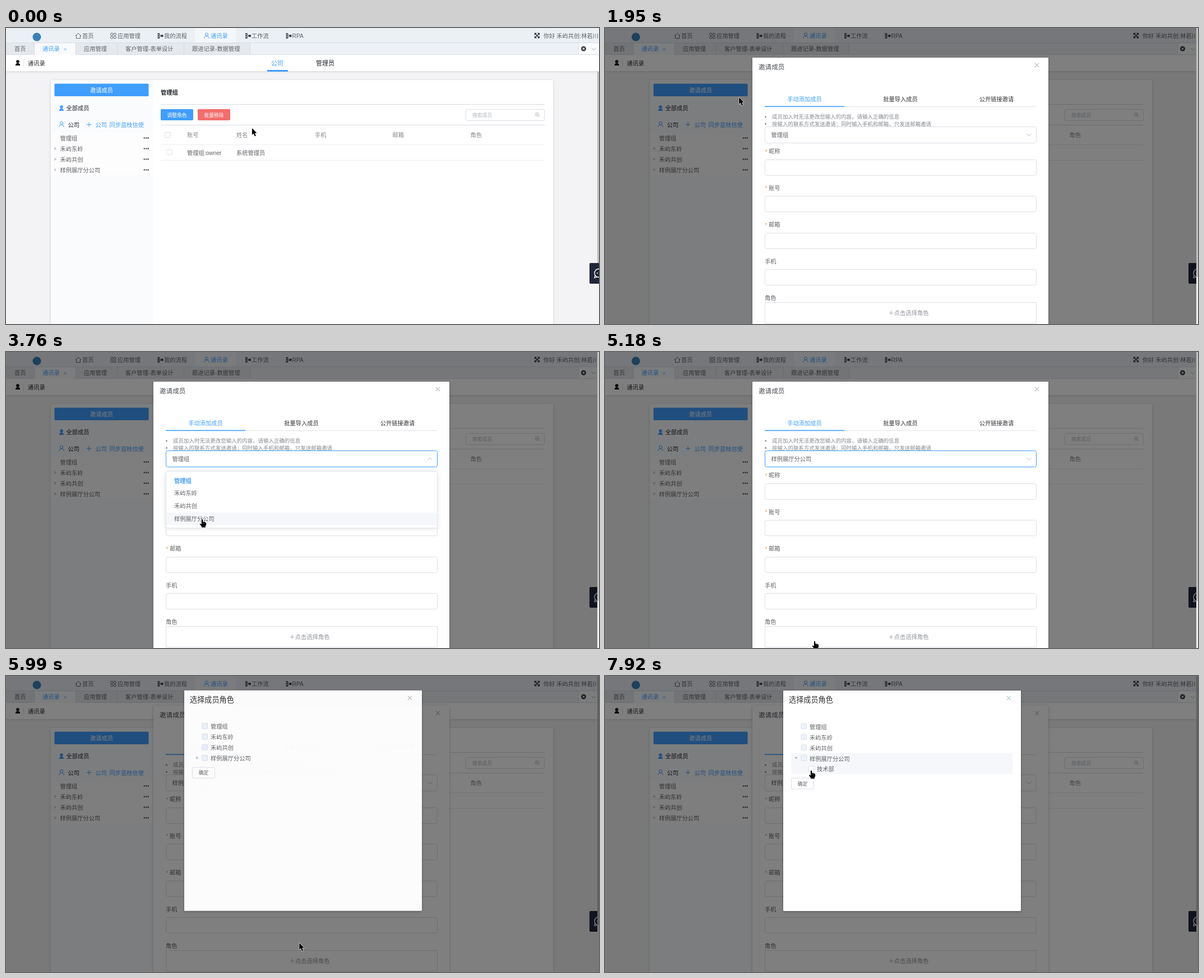
An HTML page with a canvas that plays this animation: 1058 px wide and 529 px high, repeating every 7.99 s.

```html
<!DOCTYPE html>
<html lang="zh-CN">
<head>
<meta charset="utf-8">
<title>邀请成员</title>
<style>
html, body { margin: 0; width: 100%; height: 100%; overflow: hidden; background: #f3f3f5; }
canvas { display: block; width: 1058px; height: 529px; }
</style>
</head>
<body>
<canvas id="stage" width="1058" height="529"></canvas>
<script>
const W = 1058, H = 529, LOOP = 7990;
const layer = document.createElement('canvas');
layer.width = W;
layer.height = H;
let ctx = document.getElementById('stage').getContext('2d');
const FONT = '"Liberation Sans", "Noto Sans CJK SC", "Noto Sans CJK", sans-serif';
const BLUE = '#409eff', INK = '#606266', DARK = '#1f2329', GREY = '#909399', LINE = '#dcdfe6';
const GROUPS = ['管理组', '禾屿东岭', '禾屿共创', '样例展厅分公司'];

// Bursts of screen updates: start, end, number of updates
const BURSTS = [
  [70, 810, 10], [890, 1030, 3], [1420, 1510, 2], [1950, 2660, 10],
  [2820, 2980, 3], [3060, 3580, 8], [3680, 3760, 2], [4280, 5000, 10],
  [5080, 5180, 2], [5230, 5520, 5], [5690, 5860, 3], [5990, 6420, 7],
  [6490, 6670, 3], [6750, 6960, 4], [7130, 7210, 2], [7510, 7920, 6]
];

// Pointer path: time, x, y
const PATH = [
  [0, 439, 179], [350, 370, 190], [810, 232, 124], [1030, 225, 114],
  [1880, 225, 114], [2200, 290, 160], [2450, 368, 202], [2660, 310, 197],
  [3060, 310, 197], [3580, 369, 280], [3760, 350, 299], [4360, 350, 299],
  [4750, 378, 452], [5000, 361, 495], [5180, 374, 517], [5520, 537, 508],
  [5930, 537, 508], [6420, 425, 255], [6670, 378, 166], [6960, 346, 145],
  [7210, 348, 145], [7450, 348, 145], [7920, 368, 169]
];
const HAND_TIMES = [[890, 1420], [2300, 4400], [4900, 5690], [6750, LOOP]];

const clamp = v => Math.max(0, Math.min(1, v));
const easeOut = (p, n) => 1 - Math.pow(1 - clamp(p), n);
const within = (t, a, b) => t >= a && t < b;

function snap(t) {
  let last = 0;
  for (const [a, b, n] of BURSTS) {
    if (t < a) break;
    const step = (b - a) / (n - 1);
    last = a + step * Math.min(n - 1, Math.floor((t - a) / step + 1e-6));
  }
  return last;
}

function pointer(t) {
  const i = PATH.findIndex(p => p[0] >= t);
  if (i < 0) return PATH[PATH.length - 1].slice(1);
  if (i === 0) return PATH[0].slice(1);
  const [t0, x0, y0] = PATH[i - 1], [t1, x1, y1] = PATH[i];
  const k = (t - t0) / (t1 - t0);
  return [x0 + (x1 - x0) * k, y0 + (y1 - y0) * k];
}

// Paints on a separate layer so that a whole group fades as one
function faded(alpha, paint) {
  const main = ctx;
  ctx = layer.getContext('2d');
  ctx.clearRect(0, 0, W, H);
  ctx.save();
  paint();
  ctx.restore();
  ctx = main;
  ctx.save();
  ctx.globalAlpha = alpha;
  ctx.drawImage(layer, 0, 0);
  ctx.restore();
}

function rect(x, y, w, h, color) {
  ctx.fillStyle = color;
  ctx.fillRect(x, y, w, h);
}

function box(x, y, w, h, r, fill, stroke) {
  ctx.beginPath();
  ctx.roundRect(x, y, w, h, r);
  if (fill) { ctx.fillStyle = fill; ctx.fill(); }
  if (stroke) { ctx.strokeStyle = stroke; ctx.lineWidth = 1; ctx.stroke(); }
}

function shadowBox(x, y, w, h, r, blur, color) {
  ctx.save();
  ctx.shadowColor = color;
  ctx.shadowBlur = blur;
  ctx.shadowOffsetY = 1;
  box(x, y, w, h, r, '#fff');
  ctx.restore();
}

// y is the vertical middle of the glyphs
function text(s, x, y, color = INK, size = 10.25, align = 'left', weight = '') {
  ctx.font = `${weight} ${size}px ${FONT}`;
  ctx.fillStyle = color;
  ctx.textAlign = align;
  ctx.fillText(s, x, y + size * 0.37);
}

function line(points, color, width = 1) {
  ctx.beginPath();
  points.forEach(([x, y], i) => i ? ctx.lineTo(x, y) : ctx.moveTo(x, y));
  ctx.strokeStyle = color;
  ctx.lineWidth = width;
  ctx.stroke();
}

function shape(points, color) {
  ctx.beginPath();
  points.forEach(([x, y]) => ctx.lineTo(x, y));
  ctx.closePath();
  ctx.fillStyle = color;
  ctx.fill();
}

function ring(x, y, r, color, width = 1) {
  ctx.beginPath();
  ctx.arc(x, y, r, 0, Math.PI * 2);
  ctx.strokeStyle = color;
  ctx.lineWidth = width;
  ctx.stroke();
}

function disc(x, y, r, color) {
  ctx.beginPath();
  ctx.arc(x, y, r, 0, Math.PI * 2);
  ctx.fillStyle = color;
  ctx.fill();
}

function cross(x, y, r, color, width = 1) {
  line([[x - r, y - r], [x + r, y + r]], color, width);
  line([[x + r, y - r], [x - r, y + r]], color, width);
}

function turned(x, y, angle, paint) {
  ctx.save();
  ctx.translate(x, y);
  ctx.rotate(angle);
  paint();
  ctx.restore();
}

const chevron = (x, y, angle, color) =>
  turned(x, y, angle, () => line([[-4, -2], [0, 2], [4, -2]], color));
const caret = (x, y, angle, color = '#b4b8c0') =>
  turned(x, y, angle, () => shape([[-1.5, -3], [2, 0], [-1.5, 3]], color));

function person(x, y, color, solid) {
  ctx.beginPath();
  ctx.arc(x, y + 5, 4.2, Math.PI, 0);
  if (solid) {
    ctx.closePath();
    ctx.fillStyle = color;
    ctx.fill();
    disc(x, y - 2, 2.8, color);
  } else {
    ctx.strokeStyle = color;
    ctx.lineWidth = 1;
    ctx.stroke();
    ring(x, y - 2, 2.6, color);
  }
}

function flowIcon(x, y) {
  for (const d of [-3.5, 0, 3.5]) rect(x - 5, y + d - 1.2, 3.6, 2.4, '#3c4046');
  line([[x - 2, y - 3], [x + 1, y], [x - 2, y + 3]], '#3c4046');
  disc(x + 3, y, 2.2, '#3c4046');
}

function header() {
  rect(0, 0, W, 26, '#ebf0f5');
  disc(55, 16, 7.5, '#3a80b8');
  rect(337, 0, 73, 26, '#f4f7fa');
  line([[124, 14], [129, 9.5], [134, 14]], INK);
  line([[125.5, 13], [125.5, 18.5], [132.5, 18.5], [132.5, 13]], INK);
  for (const dx of [-2.8, 2.8]) for (const dy of [-2.8, 2.8]) ring(191.5 + dx, 14 + dy, 2.2, INK);
  flowIcon(275.5, 14);
  person(358, 13.5, BLUE);
  flowIcon(432, 14);
  flowIcon(504.5, 14);
  text('首页', 136, 14);
  text('应用管理', 199, 14);
  text('我的流程', 282, 14);
  text('通讯录', 365, 14, BLUE);
  text('工作流', 438, 14);
  text('RPA', 510.5, 14);
  cross(947.5, 13.5, 4, '#33373d', 1.4);
  for (const dx of [-4, 4]) for (const dy of [-4, 4]) {
    line([[947.5 + dx, 13.5 + dy / 4], [947.5 + dx, 13.5 + dy], [947.5 + dx / 4, 13.5 + dy]], '#33373d', 1.3);
  }
  text('你好 禾屿共创:林若川', 959, 14);

  rect(0, 26, W, 22, '#edf0f4');
  rect(0, 26, 436, 22, '#e5e9ee');
  rect(50, 26, 74, 22, '#f8fafc');
  for (const x of [50, 124, 198, 317, 435]) rect(x, 26, 1, 22, '#d3d8df');
  rect(0, 26, W, 1, '#d8dde5');
  rect(0, 47, W, 1, '#d8dde5');
  rect(51, 47, 73, 1, '#f8fafc');
  text('首页', 15, 37.5);
  text('通讯录', 65, 37.5, BLUE);
  cross(105.5, 38, 2.2, '#6fb0f5', 0.9);
  text('应用管理', 139, 37.5);
  text('客户管理-表单设计', 213, 37.5);
  text('跟进记录-数据管理', 332, 37.5);
  rect(1022, 27, 36, 20, '#fafbfc');
  rect(1021, 27, 1, 20, '#d8dde5');
  disc(1030.5, 37, 4.5, '#3c4046');
  cross(1030.5, 37, 1.6, '#fff', 1.1);
  chevron(1048.5, 37.5, 0, '#a8abb2');
}

function memberPanel(t) {
  rect(80, 93, 182, 436, '#fafbfd');
  rect(80, 187, 182, 76, '#fdfdfe');
  box(86.5, 99.5, 168, 22.5, 1.5, within(t, 890, 1420) ? '#66b1ff' : BLUE);
  text('邀请成员', 170.5, 111, '#fff', 10.25, 'center');
  person(99, 143, BLUE, true);
  text('全部成员', 107.5, 143.5, DARK);
  person(99, 172, BLUE);
  text('公司', 110.5, 173, DARK);
  line([[144, 172.5], [152, 172.5]], BLUE);
  line([[148, 168.5], [148, 176.5]], BLUE);
  text('公司', 159.5, 173, BLUE);
  text('同步蓝枝信使', 184.5, 173, BLUE);
  GROUPS.forEach((name, i) => {
    const y = 197.5 + i * 19;
    if (i) caret(88, y - 1, 0, '#c0c4cc');
    text(name, 96.5, y);
    for (const dx of [-3.4, 0, 3.4]) disc(250.2 + dx, y - 1, 1.2, '#44484e');
  });
}

function chatButton() {
  box(1041, 420, 20, 37, 2, '#22263a');
  ring(1057.5, 438, 7.5, '#fff', 1.4);
  line([[1051, 442], [1050, 446.5], [1055, 445]], '#fff', 1.3);
  disc(1055, 438, 1, '#fff');
}

function page(t) {
  rect(0, 0, W, H, '#f3f3f5');
  ctx.save();
  ctx.shadowColor = 'rgba(0,0,0,.14)';
  ctx.shadowBlur = 4;
  ctx.shadowOffsetY = 1;
  rect(0, 48, W, 29, '#fff');
  ctx.restore();
  header();
  person(21, 62, '#000', true);
  rect(31, 56, 1, 14, '#e2e4e8');
  text('通讯录', 39, 63.5, DARK);
  text('公司', 473, 63, BLUE, 11);
  text('管理员', 553, 63, DARK, 11);
  rect(466, 75, 37, 3, BLUE);

  shadowBox(80, 93, 896, 450, 2, 5, 'rgba(0,0,0,.14)');
  memberPanel(t);
  text('管理组', 276, 115, DARK, 10.25, 'left', 'bold');
  for (const y of [136, 173]) rect(276, y, 685, 1, '#d9dbe0');
  for (const y of [208, 236]) rect(276, y, 685, 1, '#ebeef5');
  box(276, 145, 58, 20, 2, BLUE);
  box(342, 145, 58, 20, 2, '#f56c6c');
  text('调整角色', 305, 155.5, '#fff', 8.8, 'center');
  text('批量移除', 371, 155.5, '#fff', 8.8, 'center');
  box(820.5, 145.5, 140, 20, 2, '#fff', LINE);
  text('搜索成员', 832, 155.5, '#b4b8c0', 8.8);
  ring(947.5, 154.5, 3.2, '#b4b8c0', 0.9);
  line([[950, 157], [952, 159]], '#b4b8c0');
  line([[946, 154.5], [949, 154.5]], '#b4b8c0', 0.8);
  line([[947.5, 153], [947.5, 156]], '#b4b8c0', 0.8);
  box(283.5, 186.5, 10, 9, 1, '#fff', LINE);
  box(286.5, 217.5, 10, 9, 1, '#fff', LINE);
  ['账号', '姓名', '手机', '邮箱', '角色'].forEach((s, i) =>
    text(s, [323, 411, 551, 689.5, 828.5][i], 191.5, '#84878d', 10.25, 'left', 500));
  text('管理组:owner', 323, 223);
  text('系统管理员', 411, 223);

  rect(1055, 78, 3, 342, '#bcbcbc');
  chatButton();
}

function inviteDialog(t) {
  shadowBox(263, 53, 528, 490, 1, 4, 'rgba(0,0,0,.25)');
  text('邀请成员', 274, 69.5, '#4b4e54', 11.6);
  cross(770.5, 66.5, 3.6, GREY);
  text('手动添加成员', 356, 127.5, BLUE, 10.25, 'center');
  text('批量导入成员', 527, 127.5, '#303133', 10.25, 'center');
  text('公开链接邀请', 698.5, 127.5, '#303133', 10.25, 'center');
  rect(285, 140, 484, 1, '#dfe3ea');
  rect(285, 139.5, 142, 1.6, BLUE);
  text('成员加入时无法更改您输入的内容，请输入正确的信息', 298, 158.5, '#85888e', 9.48);
  text('按输入的联系方式发送邀请；同时输入手机和邮箱，只发送邮箱邀请', 298, 171, '#85888e', 9.48);
  disc(286.5, 159, 1.4, '#85888e');
  disc(286.5, 171.5, 1.4, '#85888e');

  const focused = within(t, 2820, 5690);
  box(285.5, 176.5, 484, 29, 3, '#fff', focused ? BLUE : LINE);
  if (t < 1510) text('公司', 296.5, 191.5, '#b8bcc4');
  else text(GROUPS[t < 4280 ? 0 : 3], 296.5, 191.5);
  const turn = easeOut((t - 2820) / 300, 2.2) - easeOut((t - 4250) / 300, 2.2);
  chevron(756.5, 191, turn * Math.PI, '#b4b8c0');

  ['昵称', '账号', '邮箱', '手机'].forEach((label, i) => {
    const y = 220 + i * 65.6, starred = i < 3;
    if (starred) text('*', 285.5, y + 1, '#e0a060');
    text(label, starred ? 292 : 285, y + 0.5);
    box(285.5, Math.floor(y + 15) + 0.5, 484, 28, 3, '#fff', LINE);
  });
  text('角色', 285, 482.5);
  box(285.5, 490.5, 484, 37, 0, '#fff', LINE);
  text('＋点击选择角色', 541.5, 509, GREY, 10.25, 'center');
}

function dropdown(t, py) {
  const open = easeOut((t - 2800) / 300, 5), shut = easeOut((t - 4250) / 300, 3);
  const k = open * (1 - shut);
  if (t < 2820 || k < 0.01) return;
  faded(k, () => {
    ctx.translate(0, 213 * (1 - k));
    ctx.scale(1, k);
    shadowBox(285, 213, 484, 101, 3, 8, 'rgba(0,0,0,.14)');
    box(285.5, 213.5, 484, 101, 3, '#fff', '#e4e7ed');
    GROUPS.forEach((name, i) => {
      const y = 230 + i * 22.7;
      if (Math.abs(py + 1 - y) < 11.3) rect(286, y - 11.3, 483, 22.7, '#f5f7fa');
      text(name, 300, y, i ? INK : BLUE, 10.25, 'left', i ? '' : 'bold');
    });
  });
}

function roleList(t) {
  const grow = easeOut((t - 7450) / 300, 2.2), shift = 19 * grow;
  shadowBox(318, 26, 424, 394, 1, 4, 'rgba(0,0,0,.3)');
  text('选择成员角色', 328, 42.5, '#303133', 13.15);
  cross(720.5, 39.5, 3.6, t > 5990 ? '#7fa9bd' : GREY);
  if (t >= 6750) rect(332, 137.5, 395, 18.7 + shift, '#f5f7fa');
  GROUPS.forEach((name, i) => {
    const y = 90.5 + i * 19;
    box(350, y - 5.5, 9.5, 9.5, 1, '#edf2fc', '#d9dee8');
    text(name, 365, y + 0.3);
  });
  if (t >= 5990) caret(341, 146.5, grow * Math.PI / 2);
  if (grow > 0) {
    ctx.save();
    ctx.beginPath();
    ctx.rect(332, 156, 395, shift);
    ctx.clip();
    box(363.5, 161, 9.5, 9.5, 1, '#fff', LINE);
    text('技术部', 378, 166.5);
    ctx.restore();
  }
  const hot = within(t, 6570, 6740);
  box(332.5, 163.5 + shift, 40, 19.5, 2, hot ? '#ecf5ff' : '#fff', hot ? '#c6e2ff' : LINE);
  text('确定', 352.5, 173.5 + shift, hot ? BLUE : INK, 8.8, 'center');
}

function roleDialog(t) {
  const k = easeOut((t - 5745) / 300, 2.25);
  if (k <= 0) return;
  faded(k, () => {
    ctx.translate(0, -14.5 * (1 - k));
    roleList(t);
  });
}

function cursor(t, x, y) {
  const hand = HAND_TIMES.some(([a, b]) => within(t, a, b));
  ctx.save();
  ctx.translate(x, y);
  ctx.lineJoin = 'round';
  ctx.beginPath();
  const points = hand
    ? [[-1, 0], [1, 0], [1.4, 4.5], [4, 4.6], [7, 6], [7.3, 10], [5.8, 12], [5.8, 14.5],
       [-0.8, 14.5], [-1.2, 12.5], [-4.2, 8.8], [-3.6, 7.4], [-1.2, 9]]
    : [[0, 0], [0, 12], [2.7, 9.6], [4.8, 14.4], [6.9, 13.5], [4.9, 8.9], [8.3, 8.6]];
  points.forEach(([px, py]) => ctx.lineTo(px, py));
  ctx.closePath();
  ctx.strokeStyle = '#fff';
  ctx.lineWidth = 1.2;
  ctx.stroke();
  ctx.fillStyle = '#000';
  ctx.fill();
  if (hand) for (const px of [2.6, 4.7]) line([[px, 5.5], [px, 7.5]], '#888', 0.6);
  ctx.restore();
}

function inviteLayer(t, py) {
  rect(1055, 0, 3, H, '#f1f1f1');
  rect(1055, 0, 3, 445, '#c1c1c1');
  inviteDialog(t);
  dropdown(t, py);
}

function draw(t) {
  const [px, py] = pointer(t);
  const shade = `rgba(0,0,0,${t < 1510 ? 0.045 : 0.5})`;
  page(t);
  if (t >= 5690) {
    inviteLayer(t, py);
    rect(0, 0, W, H, shade);
    roleDialog(t);
  } else if (t >= 1420) {
    rect(0, 0, W, H, shade);
    inviteLayer(t, py);
  }
  cursor(t, px, py);
}

const start = performance.now();
function tick() {
  draw(snap((performance.now() - start) % LOOP));
  requestAnimationFrame(tick);
}
tick();
</script>
</body>
</html>
```
